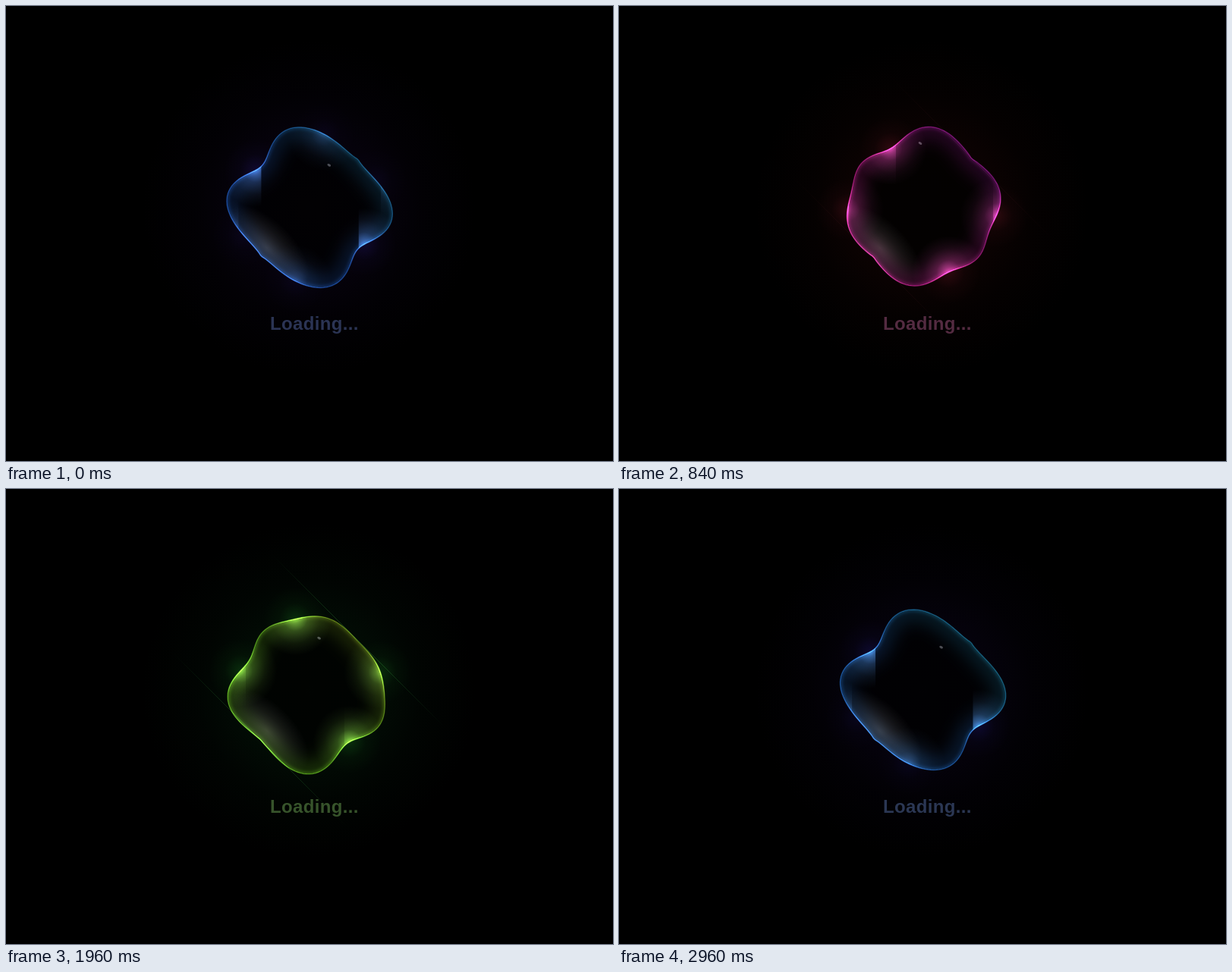
An HTML page with a canvas for the animation above (3 s loop, 800x600 px).

```html
<!DOCTYPE html>
<html lang="en">
<head>
<meta charset="utf-8">
<title>Loading</title>
<style>
  html, body { margin: 0; width: 100%; height: 100%; overflow: hidden; background: #000; }
  canvas { display: block; }
</style>
</head>
<body>
<canvas id="stage" width="800" height="600"></canvas>
<script>
const ctx = document.getElementById('stage').getContext('2d');
const LOOP = 3000, BEAT = 1500, STEP = 40;
const CX = 400, CY = 266;
const TAU = Math.PI * 2;

// A ripple runs down the blob from upper right to lower left.
const AXIS = TAU * 3 / 8;   // direction of travel
const WAVE = 108;           // distance between two dents
const REACH = 105, TILT = 9, DEPTH = 7.5;

const clamp = (v, lo, hi) => Math.max(lo, Math.min(hi, v));
const hsl = (h, s, l, a = 1) => `hsla(${h % 360},${s}%,${l}%,${a})`;
const dentAt = t => -1 + WAVE * (t % BEAT) / BEAT;

function radius(angle, t) {
  const along = Math.cos(angle - AXIS), across = Math.sin(angle - AXIS);
  const u = REACH * along - TILT * across;
  const ripple = -Math.cos(TAU * (u - dentAt(t)) / WAVE) * Math.sqrt(Math.abs(across));
  return 97.5 + 6.5 * Math.cos(4 * angle) + DEPTH * ripple;
}

function rimPoint(angle, t) {
  const r = radius(angle, t);
  return { x: CX + r * Math.cos(angle), y: CY + r * Math.sin(angle) };
}

function outline(t) {
  const path = new Path2D();
  for (let i = 0; i < 180; i++) {
    const p = rimPoint(i / 180 * TAU, t);
    path.lineTo(p.x, p.y);
  }
  path.closePath();
  return path;
}

// Light gathers next to each dent, on both sides of the axis.
function creasesAt(t) {
  const list = [];
  for (const side of [-1, 1]) {
    for (let n = -1; n <= 1; n++) {
      const u = dentAt(t) + n * WAVE;
      const power = 1 - clamp((Math.abs(u) - 80) / 50, 0, 1);
      if (!power) continue;
      const along = clamp((u + TILT * side) / REACH, -.88, .88);
      const angle = AXIS + side * Math.acos(along);
      list.push({ ...rimPoint(angle - .1, t), seam: rimPoint(angle, t).x, power });
    }
  }
  return list;
}

function radial(x, y, r, stops) {
  const g = ctx.createRadialGradient(x, y, 0, x, y, r);
  stops.forEach((c, i) => g.addColorStop(i / (stops.length - 1), c));
  return g;
}

function blob(x, y, r, stops) {
  ctx.fillStyle = radial(x, y, r, stops);
  ctx.fillRect(x - r, y - r, r * 2, r * 2);
}

function softStroke(path, style, width, blur, alpha) {
  ctx.save();
  ctx.filter = `blur(${blur}px)`;
  ctx.globalAlpha = alpha;
  ctx.strokeStyle = style;
  ctx.lineWidth = width;
  ctx.stroke(path);
  ctx.restore();
}

// Side creases are cut by a vertical seam while the blob is folded.
function drawCrease(c, hot, fold) {
  const glow = a => blob(c.x, c.y, 48, [.6, .22, .08, 0].map(v => hot(v * a * c.power)));
  const dx = c.seam - CX;
  const cut = Math.abs(dx) > 30 ? fold : 0;
  glow(1 - cut);
  if (!cut) return;
  ctx.save();
  ctx.beginPath();
  ctx.rect(dx < 0 ? 0 : c.seam, 0, dx < 0 ? c.seam : 800, 600);
  ctx.clip();
  glow(cut);
  ctx.restore();
}

// Faint lines that prolong the two flat sides.
function drawFlares(hue, power) {
  ctx.lineWidth = 1;
  for (const side of [-1, 1]) {
    const x = CX + 65 * side, y = CY - 65 * side, d = 115;
    const g = ctx.createLinearGradient(x - d, y - d, x + d, y + d);
    g.addColorStop(0, hsl(hue + 40, 60, 50, 0));
    g.addColorStop(.5, hsl(hue + 25, 80, 65, .45 * power));
    g.addColorStop(1, hsl(hue + 40, 60, 50, 0));
    ctx.strokeStyle = g;
    ctx.beginPath();
    ctx.moveTo(x - d, y - d);
    ctx.lineTo(x + d, y + d);
    ctx.stroke();
  }
}

function draw(t) {
  const hue = 217 + 360 * t / LOOP;
  const swing = Math.cos(TAU * t / LOOP);
  const fold = (1 + swing) / 2;
  const hot = a => hsl(hue, 90, 67, a);
  const haze = a => hsl(hue + 45, 70, 4, a);
  const path = outline(t);
  const creases = creasesAt(t);

  ctx.globalCompositeOperation = 'source-over';
  ctx.fillStyle = '#000';
  ctx.fillRect(0, 0, 800, 600);
  blob(CX, CY, 220, [haze(1), haze(.8), haze(.25), haze(0)]);

  ctx.globalCompositeOperation = 'lighter';
  for (const c of creases) {
    blob(c.x, c.y, 42, [.14, .03, 0].map(v => hsl(hue + 30, 80, 55, v * c.power)));
  }

  ctx.globalCompositeOperation = 'source-over';
  ctx.fillStyle = 'rgba(0,0,0,.8)';
  ctx.fill(path);

  const edge = ctx.createLinearGradient(330, 330, 480, 200);
  edge.addColorStop(0, hsl(hue, 72, 48));
  edge.addColorStop(.45, hsl(hue, 72, 44));
  edge.addColorStop(1, hsl(hue - 20, 72, 36));

  ctx.save();
  ctx.clip(path);
  ctx.globalCompositeOperation = 'lighter';
  softStroke(path, edge, 30, 11, .22);
  for (const c of creases) drawCrease(c, hot, fold);

  // pale reflection along the lower left side
  ctx.save();
  ctx.translate(344, 319);
  ctx.rotate(TAU / 8);
  ctx.scale(1, .5);
  blob(0, 0, 70, ['rgba(120,116,112,.4)', 'rgba(100,98,96,.2)', 'rgba(90,90,90,0)']);
  ctx.restore();

  softStroke(path, edge, 5, 2, .3);
  ctx.restore();

  ctx.globalCompositeOperation = 'lighter';
  ctx.strokeStyle = edge;
  ctx.lineWidth = 1.2;
  ctx.globalAlpha = .5;
  ctx.stroke(path);
  ctx.globalAlpha = 1;
  ctx.lineWidth = 1.6;
  for (const c of creases) {
    ctx.strokeStyle = radial(c.x, c.y, 36, [.45, .2, 0].map(v => hot(v * c.power)));
    ctx.stroke(path);
  }
  ctx.strokeStyle = radial(338, 328, 60, [hot(.3), hot(.2), hot(0)]);
  ctx.stroke(path);
  drawFlares(hue, Math.max(0, -swing));

  const drift = 15 * Math.cos(TAU * t / BEAT - .4);
  ctx.fillStyle = 'rgba(150,150,155,.5)';
  ctx.beginPath();
  ctx.ellipse(412 + drift, 196 + drift, 2.5, 1.5, .5, 0, TAU);
  ctx.fill();

  ctx.globalCompositeOperation = 'source-over';
  ctx.font = 'bold 24px "Liberation Sans", Arial, sans-serif';
  ctx.letterSpacing = '0.35px';
  ctx.fillStyle = hsl(hue + 10, 32, 25);
  ctx.fillText('Loading...', 348, 427);
}

const start = performance.now();
function tick() {
  const t = (performance.now() - start) % LOOP;
  draw(Math.floor(t / STEP) * STEP);
  requestAnimationFrame(tick);
}
tick();
</script>
</body>
</html>
```
